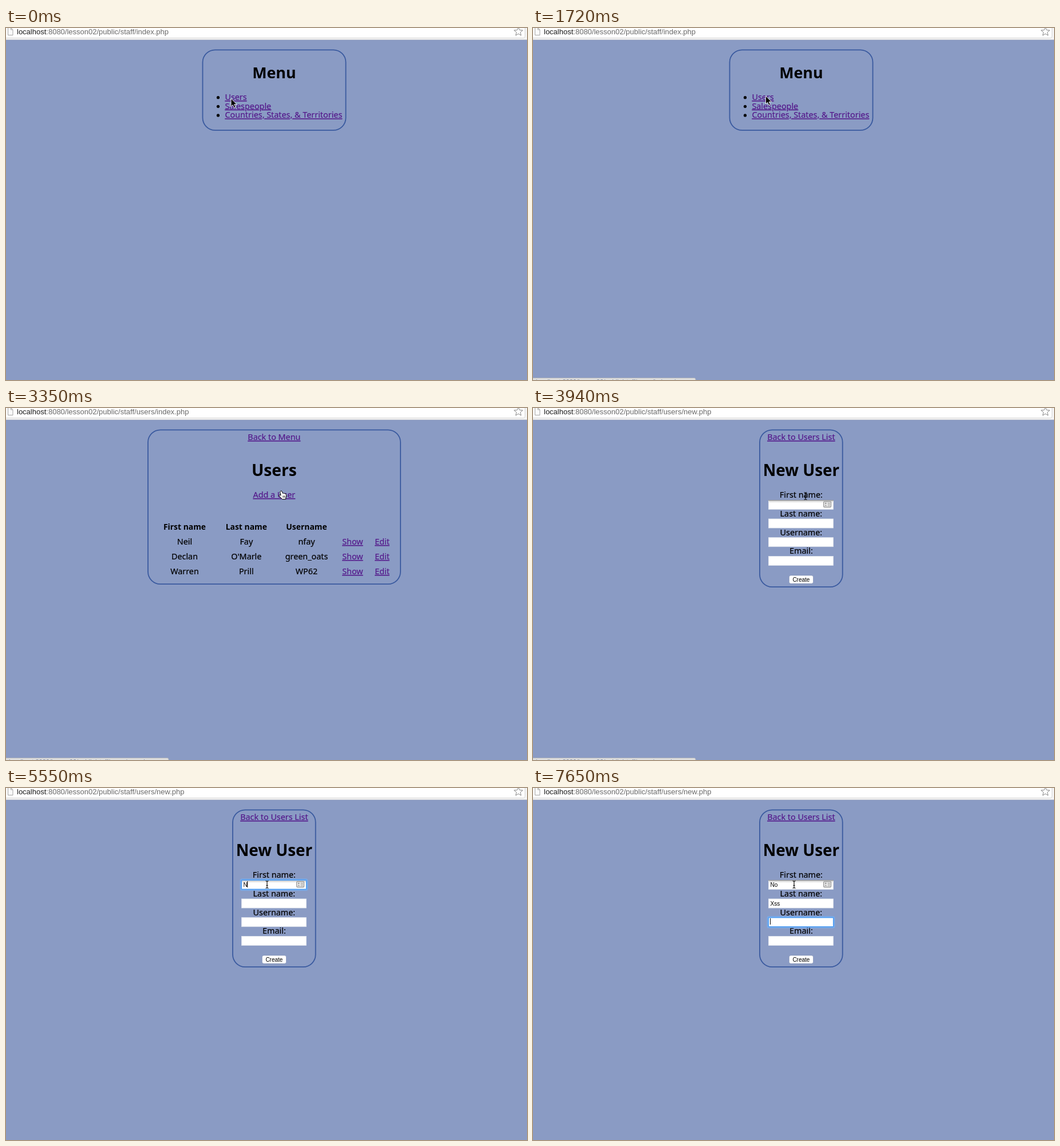
Recreate the animation shown at these times as an HTML page. Size 910 by 616 pixels, loop 8000 ms.

```html
<!DOCTYPE html>
<html lang="en">
<head>
<meta charset="utf-8">
<title>User admin walkthrough</title>
<style>
  html, body { margin: 0; width: 100%; height: 100%; overflow: hidden; background: #8a9bc4; }
  svg { display: block; width: 910px; height: 616px; }
  text { white-space: pre; }
  .page { font: 14.35px "Noto Sans", "Open Sans", sans-serif; }
  .page text { stroke: #000; stroke-width: .2; }
  .page .title, .page .bold, .page .ui { stroke: none; }
  .bold { font-weight: 700; font-size: 13.9px; }
  .title { font-weight: 700; }
  .page .link { fill: #551a8b; stroke: #551a8b; text-decoration: underline; text-decoration-thickness: 1.1px; }
  .ui { font-family: "Liberation Sans", Arial, sans-serif; }
  .mid { text-anchor: middle; }
</style>
</head>
<body>
<svg id="stage" viewBox="0 0 910 616"></svg>
<script>
const LOOP = 8000;
const HOST = 'localhost', ROOT = ':8080/lesson02/public/staff/';
const CENTER = 468.4;

const text = (x, y, s, cls = '', extra = '') =>
  `<text x="${x}" y="${y}" class="${cls}" ${extra}>${s}</text>`;
const rect = (x, y, w, h, extra) =>
  `<rect x="${x}" y="${y}" width="${w}" height="${h}" ${extra}/>`;
const panel = (x, w, h) =>
  rect(x, 38.4, w, h, 'rx="21.6" fill="none" stroke="#3a5a9f" stroke-width="1.8"');
const title = (y, s, size) => text(CENTER, y, s, 'title mid', `style="font-size:${size}px"`);
const group = (id, body, cls = '') => `<g id="${id}" class="${cls}">${body}</g>`;

function menuPage() {
  const items = ['Users', 'Salespeople', 'Countries, States, &amp; Territories'];
  return panel(343.5, 250, 140.5) + title(88, 'Menu', 26.8) +
    items.map((s, i) => `<circle cx="370.5" cy="${121.7 + i * 15.6}" r="2.6"/>` +
      text(382.4, 126 + i * 15.6, s, 'link')).join('');
}

function usersPage() {
  const columns = [312, 419.8, 525, 605.4, 657];
  const rows = [
    ['First name', 'Last name', 'Username'],
    ['Neil', 'Fay', 'nfay', 'Show', 'Edit'],
    ['Declan', "O'Marle", 'green_oats', 'Show', 'Edit'],
    ['Warren', 'Prill', 'WP62', 'Show', 'Edit']
  ];
  return panel(248, 441, 269.7) + text(CENTER, 56, 'Back to Menu', 'link mid') +
    title(119, 'Users', 28.2) + text(CENTER, 157, 'Add a User', 'link mid') +
    rows.map((row, r) => row.map((s, c) =>
      text(columns[c], 213 + r * 26, s, 'mid ' + (r ? c > 2 ? 'link' : '' : 'bold'))).join('')).join('');
}

const fieldTop = i => 161 + i * 32.7;

function formPage() {
  const labels = ['First name:', 'Last name:', 'Username:', 'Email:'];
  const fields = labels.map((s, i) => {
    const y = fieldTop(i);
    return text(CENTER, 157 + i * 32.8, s, 'mid') +
      rect(411.4, y + .3, 113, 16, 'fill="#fff" stroke="#dfe3eb" stroke-width=".8"') +
      (i ? '' : rect(412, 161, 112.5, 5, 'fill="url(#shade)"') +
        '<path d="M411 161.5h114" stroke="#8c8c8c"/>') +
      text(414.5, y + 12, '', 'ui typed', 'font-size="10"');
  }).join('');
  const card = rect(507.7, 163.7, 12.8, 9.8, 'rx="1.5" fill="#eee" stroke="#9b9b9b" stroke-width="1.4"') +
    '<circle cx="511.3" cy="167" r="1.4" fill="#999"/><path d="M509.4 171.5q1.9-4 3.8 0z" fill="#999"/>' +
    '<path d="M514.5 166.5h4.5M514.5 168.7h4.5M514.5 171h4.5" stroke="#999"/>';
  return panel(396, 144.7, 274.7) + text(CENTER, 56, 'Back to Users List', 'link mid') +
    title(119, 'New User', 27.8) + fields +
    group('focus', rect(410, -1, 116, 18.5, 'rx="2" fill="none" stroke="#6db3ff" stroke-opacity=".55" stroke-width="3"') +
      rect(411.3, .3, 113.4, 16, 'rx="1" fill="none" stroke="#4d9df5" stroke-width="1.6"')) +
    card +
    rect(447.3, 293, 42.2, 14.3, 'rx="3" fill="#fff" stroke="#7686ad" stroke-width=".6"') +
    text(CENTER, 303.8, 'Create', 'ui mid', 'font-size="10"') +
    group('caret', rect(0, 0, 1, 11, ''));
}

function toolbar() {
  const star = Array.from({ length: 10 }, (_, i) => {
    const a = i * Math.PI / 5, r = i % 2 ? 3.6 : 8;
    return `${(895 + r * Math.sin(a)).toFixed(1)},${(6.5 - r * Math.cos(a)).toFixed(1)}`;
  }).join(' ');
  return rect(0, 0, 910, 21, 'fill="#f5f5f5"') +
    rect(-5, -9, 911.5, 26.5, 'rx="3" fill="#fff" stroke="#d4d4d4"') +
    '<path d="M0 20.5h910" stroke="#c6c9d1"/>' +
    '<path d="M3.5-1V12.5H12V3L8.5-.5V3H12" fill="#fafafa" stroke="#a5a5a5"/>' +
    `<polygon points="${star}" fill="#fff" stroke="#858585" stroke-linejoin="round"/>` +
    `<text x="19" y="11.2" class="ui" font-size="13" fill="#6a6a6a"><tspan fill="#1c1c1c">${HOST}</tspan><tspan id="url"></tspan></text>`;
}

const statusBar =
  '<path d="M-1 612.5H281.5q2.5 0 2.5 2.5v3H-1z" fill="#dedede" stroke="#b4b7bd"/>' +
  text(5, 623.4, '', 'ui', 'id="statusText" font-size="11" fill="#77829a"');

const cursors = {
  arrow: '<path d="M0 0V14l3.2-3 2.3 5.2 2.5-1.1-2.3-5h4.4z" fill="#000" stroke="#fff" stroke-width=".9"/>',
  hand: '<path d="M-4-7.6q1.6-1.6 2.6.4l1.4 3.4q1.4-1.1 2.1.2 1.4-.7 2 .5 1.4-.3 1.7 1.1l.4 3.6-1 2.4v2.4H-1L-6.1 1q-1.5-2 .7-2.4l2 1.3-1.2-5.2q-.3-1.4.6-2.3z" fill="#fff" stroke="#000"/>' +
    '<path d="M.3.2v3.4M2.1.2v3.4M3.7.2v3.4" stroke="#000" stroke-width=".7"/>',
  beam: '<path d="M-2.5-6.2q2 0 2.5 1 .5-1 2.5-1M0-5.2V5.2M-2.5 6.2q2 0 2.5-1 .5 1 2.5 1M-1.5 1.5h3" fill="none" stroke="#000" stroke-width="1.1"/>'
};

const stage = document.getElementById('stage');
stage.innerHTML =
  '<defs><linearGradient id="shade" x2="0" y2="1"><stop stop-color="#bbb"/><stop offset="1" stop-color="#fff"/></linearGradient></defs>' +
  rect(0, 0, 910, 616, 'fill="#8a9bc4"') + toolbar() +
  group('menu', menuPage(), 'page') + group('users', usersPage(), 'page') + group('form', formPage(), 'page') +
  group('status', statusBar) +
  group('cursor', Object.entries(cursors).map(([id, body]) => group(id, body)).join(''));

const el = id => document.getElementById(id);
const typed = [...stage.querySelectorAll('.typed')];
const show = (id, on) => el(id).setAttribute('display', on ? 'inline' : 'none');
const move = (id, x, y) => el(id).setAttribute('transform', `translate(${x} ${y})`);

// Timelines: the last entry whose time has passed applies.
const at = (list, t) => list.filter(e => e[0] <= t).pop().slice(1);
const urls = [[0, 'index.php'], [2310, 'users/index.php'], [3790, 'users/new.php']];
const pages = [[0, 'menu'], [2460, 'users'], [3940, 'form']];
const pointers = [[0, 'arrow'], [1860, 'hand'], [2760, 'arrow'], [3200, 'hand'], [3940, 'beam']];
const statuses = [[0, ''], [1560, 'users/index.php'], [2760, ''], [3200, 'users/new.php'], [4220, '']];
// [time, focused field, first name, last name, caret visible]
const typing = [
  [0, -1, '', '', 0], [4660, 0, '', '', 1], [5110, 0, '', '', 0], [5550, 0, 'N', '', 1],
  [6000, 0, 'N', '', 0], [6150, 0, 'No', '', 1], [6450, 1, 'No', '', 1], [6900, 1, 'No', '', 0],
  [7050, 1, 'No', 'X', 1], [7200, 1, 'No', 'Xs', 1], [7350, 1, 'No', 'Xss', 1], [7650, 2, 'No', 'Xss', 1]
];

// The pointer moves in bursts of discrete steps: [start, end, steps].
const bursts = [[0, 0, 2], [150, 680, 4], [1120, 2160, 8], [2760, 3790, 8], [3940, 4660, 6]];
const path = [
  [0, 393, 123.5], [680, 399, 121], [1120, 400, 121], [1714, 406.5, 119], [2160, 400, 129],
  [2700, 400, 129], [3250, 486, 153], [3640, 476, 154], [3940, 476, 154], [4516, 456, 169], [LOOP, 456, 169]
];

function snap(t) {
  const [start, end, steps] = bursts.filter(b => b[0] <= t).pop();
  const gap = (end - start) / (steps - 1) || 1;
  return Math.min(end, start + Math.floor((t - start) / gap + 1e-6) * gap);
}

function pointerAt(t) {
  const time = snap(t);
  const next = Math.max(1, path.findIndex(p => p[0] > time));
  const [t0, x0, y0] = path[next - 1], [t1, x1, y1] = path[next];
  const k = (time - t0) / (t1 - t0);
  return [x0 + (x1 - x0) * k, y0 + (y1 - y0) * k];
}

function render(t) {
  const [page] = at(pages, t), [pointer] = at(pointers, t), [status] = at(statuses, t);
  ['menu', 'users', 'form'].forEach(id => show(id, id === page));
  Object.keys(cursors).forEach(id => show(id, id === pointer));
  el('url').textContent = ROOT + at(urls, t)[0];
  show('status', status);
  el('statusText').textContent = HOST + ROOT + status;
  move('cursor', ...pointerAt(t));

  const [field, first, last, caret] = at(typing, t);
  [first, last].forEach((s, i) => typed[i].textContent = s);
  show('focus', field >= 0);
  show('caret', caret);
  if (field >= 0) {
    const value = typed[field];
    const width = value.textContent ? value.getComputedTextLength() : 0;
    move('focus', 0, fieldTop(field));
    move('caret', 414 + width, Math.round(fieldTop(field) + 2));
  }
}

const begin = performance.now();
function tick() {
  render((performance.now() - begin) % LOOP);
  requestAnimationFrame(tick);
}
tick();
</script>
</body>
</html>
```
